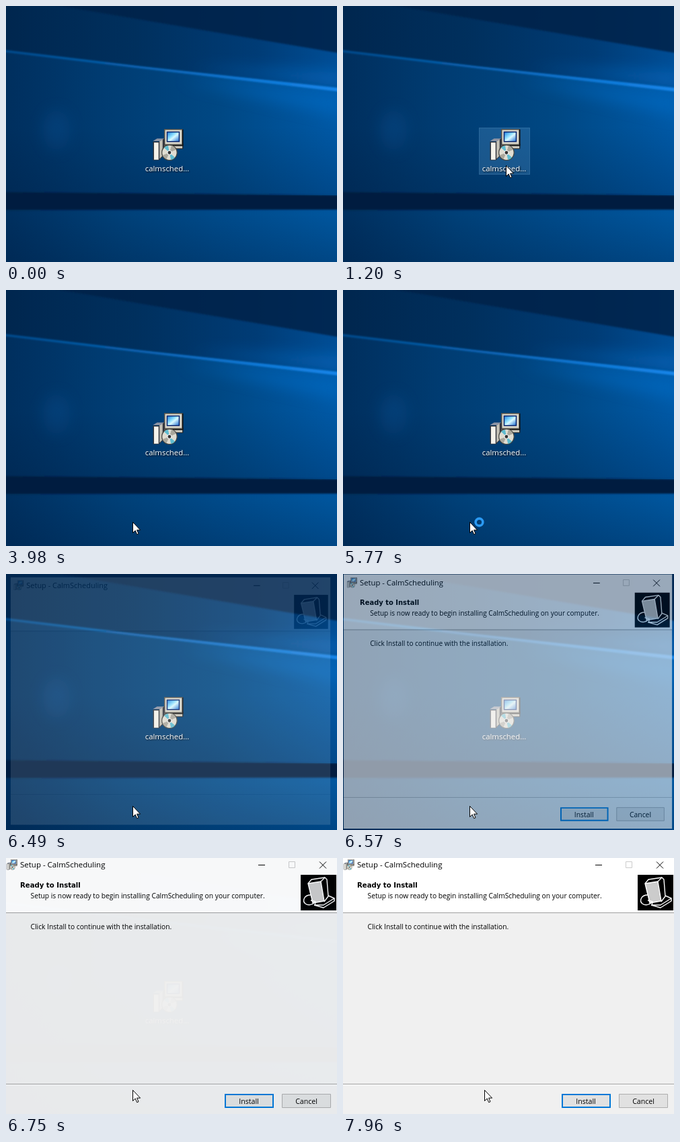
An HTML page for the animation above (8 s loop, 492x381 px).

```html
<!DOCTYPE html>
<html lang="en">
<head>
<meta charset="utf-8">
<title>Installer start</title>
<style>
  html, body { margin: 0; width: 100%; height: 100%; overflow: hidden; background: #003a70; }
  svg { display: block; }
  #stage { width: 100vw; height: 100vh; }
  text { font-family: "Open Sans", "Noto Sans", sans-serif; }
  .label text { font-size: 11.4px; fill: #fff; text-anchor: middle; filter: drop-shadow(1px 1px 1px #000); }
  #dialog text { font-size: 10.25px; fill: #000; }
  #dialog .title { font-size: 11.5px; }
  #dialog .heading { font: bold 10.15px "DejaVu Sans", sans-serif; }
  #dialog .button { text-anchor: middle; font-size: 10.6px; }
</style>
</head>
<body>
<svg id="stage" viewBox="0 0 492 381">
  <defs>
    <linearGradient id="sky">
      <stop offset="0" stop-color="#002f5e"/><stop offset=".3" stop-color="#003c72"/>
      <stop offset=".65" stop-color="#004884"/><stop offset="1" stop-color="#0059a6"/>
    </linearGradient>
    <linearGradient id="upper">
      <stop offset="0" stop-color="#00264e"/><stop offset=".4" stop-color="#00305e"/>
      <stop offset=".75" stop-color="#003c76"/><stop offset="1" stop-color="#004f98"/>
    </linearGradient>
    <linearGradient id="beam">
      <stop offset="0" stop-color="#00498a"/><stop offset=".45" stop-color="#0a64b4"/>
      <stop offset=".75" stop-color="#0f78d6"/><stop offset="1" stop-color="#1686ea"/>
    </linearGradient>
    <linearGradient id="floor">
      <stop offset="0" stop-color="#002f5e"/><stop offset=".35" stop-color="#004078"/>
      <stop offset="1" stop-color="#00569e"/>
    </linearGradient>
    <linearGradient id="shade" x2="0" y2="1">
      <stop offset="0" stop-color="#001a3c" stop-opacity="0"/><stop offset="1" stop-color="#001a3c" stop-opacity=".25"/>
    </linearGradient>
    <linearGradient id="screen" x2="1" y2="1">
      <stop offset="0" stop-color="#1b7fe0"/><stop offset=".4" stop-color="#8fe0ff"/>
      <stop offset=".55" stop-color="#d8f8ff"/><stop offset="1" stop-color="#1668d0"/>
    </linearGradient>
    <filter id="soft" x="-20%" y="-50%" width="140%" height="200%"><feGaussianBlur stdDeviation="1.2"/></filter>
    <filter id="haze" x="-50%" y="-80%" width="200%" height="260%"><feGaussianBlur stdDeviation="11"/></filter>

    <symbol id="setup" viewBox="0 0 32 32">
      <path d="M12 15h18.5v4.5H12z" fill="#d4d0c4" stroke="#222" stroke-width=".8"/>
      <path d="M12.5.5h17.5v15H12.5z" fill="#dcd9cc" stroke="#55534c"/>
      <path d="M30.5.5v16H13" fill="none" stroke="#111"/>
      <path d="M15 3h12v9.5H15z" fill="url(#screen)" stroke="#06246e"/>
      <path d="M1 12.5h6.5l3-3h2v9l-2 9-3.5 3.5H1z" fill="#33363e"/>
      <path d="M2 13.5h4.5v17H2z" fill="#f4f2ea"/>
      <path d="M7.5 12l3-2v16.500l-3 3z" fill="#c4c1b6"/>
      <path d="M1 12l4-2.500h7l-3.500 2.500z" fill="#8e94a4"/>
      <circle cx="17.3" cy="23.5" r="7.5" fill="#e0ddd2" stroke="#44443f" stroke-width=".8"/>
      <path d="M17.3 23.5L12 18.5a7.2 7.2 0 0 1 4-2zM17.3 23.5l5.5 4.8a7 7 0 0 1-4 2.3z" fill="#5fbcd0"/>
      <path d="M17.3 23.5l2-7a7 7 0 0 1 4.500 4zM17.3 23.5l-3 6.500a7 7 0 0 1-3.600-4z" fill="#aaa79c"/>
      <circle cx="17.3" cy="23.5" r="2" fill="#333" stroke="#eee" stroke-width=".8"/>
    </symbol>
  </defs>

  <g id="wallpaper">
    <path d="M0 0h492v381H0z" fill="url(#sky)"/>
    <path d="M260 110L500 130V165z" fill="#0070cc" opacity=".5" filter="url(#haze)"/>
    <path d="M-9-9H501V124L200 90-9 66z" fill="url(#upper)"/>
    <path d="M270 92L500 120V98z" fill="#0a78d8" opacity=".45" filter="url(#haze)"/>
    <path d="M75-9H501V71L75-1z" fill="#002349" opacity=".85" filter="url(#soft)"/>
    <path d="M-9 64.500L200 89.500 501 122.500V128L200 93-9 68z" fill="url(#beam)" filter="url(#soft)"/>
    <ellipse cx="75" cy="185" rx="20" ry="30" fill="#0a559a" opacity=".3" filter="url(#haze)"/>
    <path d="M0 180h492v100H0z" fill="url(#shade)"/>
    <path d="M0 290h492v91H0z" fill="url(#floor)"/>
    <path d="M0 310h492v71H0z" fill="url(#shade)"/>
    <path d="M-9 277L501 281.500V303L-9 303.500z" fill="#001f40" filter="url(#soft)"/>
  </g>

  <rect id="selection" x="202.5" y="181.5" width="75" fill="#7cbcf0" fill-opacity=".75" stroke="#9cd0fa"/>
  <use href="#setup" x="217" y="183" width="48" height="48"/>
  <g class="label" id="shortLabel"><text x="239.5" y="246">calmsched...</text></g>
  <g class="label" id="fullLabel">
    <text x="239.5" y="246">calmscheduli</text>
    <text x="239.5" y="261">ng-setup.exe</text>
  </g>

  <g id="dialog">
    <path d="M-3.5-2.5h498v386h-498z" fill="#f0f0f0"/>
    <path d="M-3.5-2.5h498V81h-498z" fill="#fff"/>
    <path d="M-3.5 81.5h498M-3.5 336.5h498" stroke="#a0a0a0"/>
    <path d="M-3.5 337.5h498" stroke="#fff"/>
    <use href="#setup" x="1" y="2" width="16" height="16"/>
    <text class="title" x="21" y="14">Setup - CalmScheduling</text>
    <path d="M375 10.5h10M466 5.5l10 10m0-10l-10 10" stroke="#000"/>
    <path d="M420.5 5.5h9v9h-9z" fill="none" stroke="#ccc"/>

    <path d="M438 25h53v53h-53z"/>
    <g stroke="#fff" stroke-width="1.4" stroke-linejoin="round" fill="none">
      <path d="M449 38l5-6 20-3 3 3 2 25-6 8"/>
      <path d="M449 38l19-3 5 29-17 3z" fill="#ccc"/>
      <path d="M468 35l6-6M479 56l9 4v4l-16 10-14-4M458 70l14 0 16-10"/>
      <path d="M453 55c-10 0-13 9-8 13 4 3 10 2 14-2m-6-3l7 2-1 6"/>
    </g>

    <g id="controls">
      <text class="heading" x="21" y="44">Ready to Install</text>
      <text x="36.5" y="60">Setup is now ready to begin installing CalmScheduling on your computer.</text>
      <text x="36.5" y="106">Click Install to continue with the installation.</text>
      <path d="M326 352h71v19h-71z" fill="#e1e1e1" stroke="#0078d7" stroke-width="2"/>
      <path d="M410.5 351.5h72v20h-72z" fill="#e1e1e1" stroke="#adadad"/>
      <text class="button" x="361" y="366">Install</text>
      <text class="button" x="446.5" y="366">Cancel</text>
    </g>
  </g>

  <g id="pointer">
    <path d="M.5.5v16l3.7-3.500 2.500 5.700 2.300-1-2.400-5.500h5z" fill="#fff" stroke="#000"/>
    <circle id="busy" cx="14.5" cy=".5" r="5.4" fill="none" stroke="#2b9af3" stroke-width="3.6"/>
  </g>
</svg>

<script>
const LOOP = 8000;
const $ = id => document.getElementById(id);
const show = (id, on) => { $(id).style.display = on ? "" : "none"; };
const between = (t, from, to) => t >= from && t < to;

// start time, opacity, scale
const OPENING = [
  [6440, .05, .946], [6490, .13, .954], [6540, .42, .971], [6570, .6, .98], [6620, .78, .99],
  [6660, .87, .995], [6700, .93, .998], [6750, .97, 1], [6810, 1, 1]
];

function pointerAt(t) {
  if (t < 570 || between(t, 3265, 3980)) return null;
  if (t < 1380) {
    const p = Math.min(9, Math.floor((t - 570) / 76.6)) / 9;
    const rest = (1 - p) ** 2;
    return [Math.round(240 + 135 * rest), Math.round(235 + 130 * rest)];
  }
  if (t < 3980) return [240, 234];
  return [t < 7900 ? 188 : t < 7960 ? 199 : 210, 345];
}

function draw(t) {
  const pointer = pointerAt(t);
  show("pointer", pointer);
  if (pointer) $("pointer").setAttribute("transform", `translate(${pointer})`);
  show("busy", between(t, 2630, 3265) || between(t, 5770, 6280));

  const selected = between(t, 1520, 3360);
  const hovered = t < 1520 && pointer && pointer[0] < 278 && pointer[1] < 251;
  show("selection", selected || hovered);
  $("selection").setAttribute("height", selected ? 84 : 69);
  $("selection").style.opacity = selected && t < 3170 ? .48 : .28;
  show("fullLabel", selected);
  show("shortLabel", !selected);

  const step = OPENING.filter(s => t >= s[0]).pop();
  show("dialog", step);
  show("controls", t >= 6540); // the frame opens before its contents are painted
  if (step) {
    $("dialog").style.opacity = step[1];
    $("dialog").setAttribute("transform", `translate(224 158) scale(${step[2]}) translate(-224 -158)`);
  }
}

function tick() {
  draw(performance.now() % LOOP);
  requestAnimationFrame(tick);
}
tick();
</script>
</body>
</html>
```
